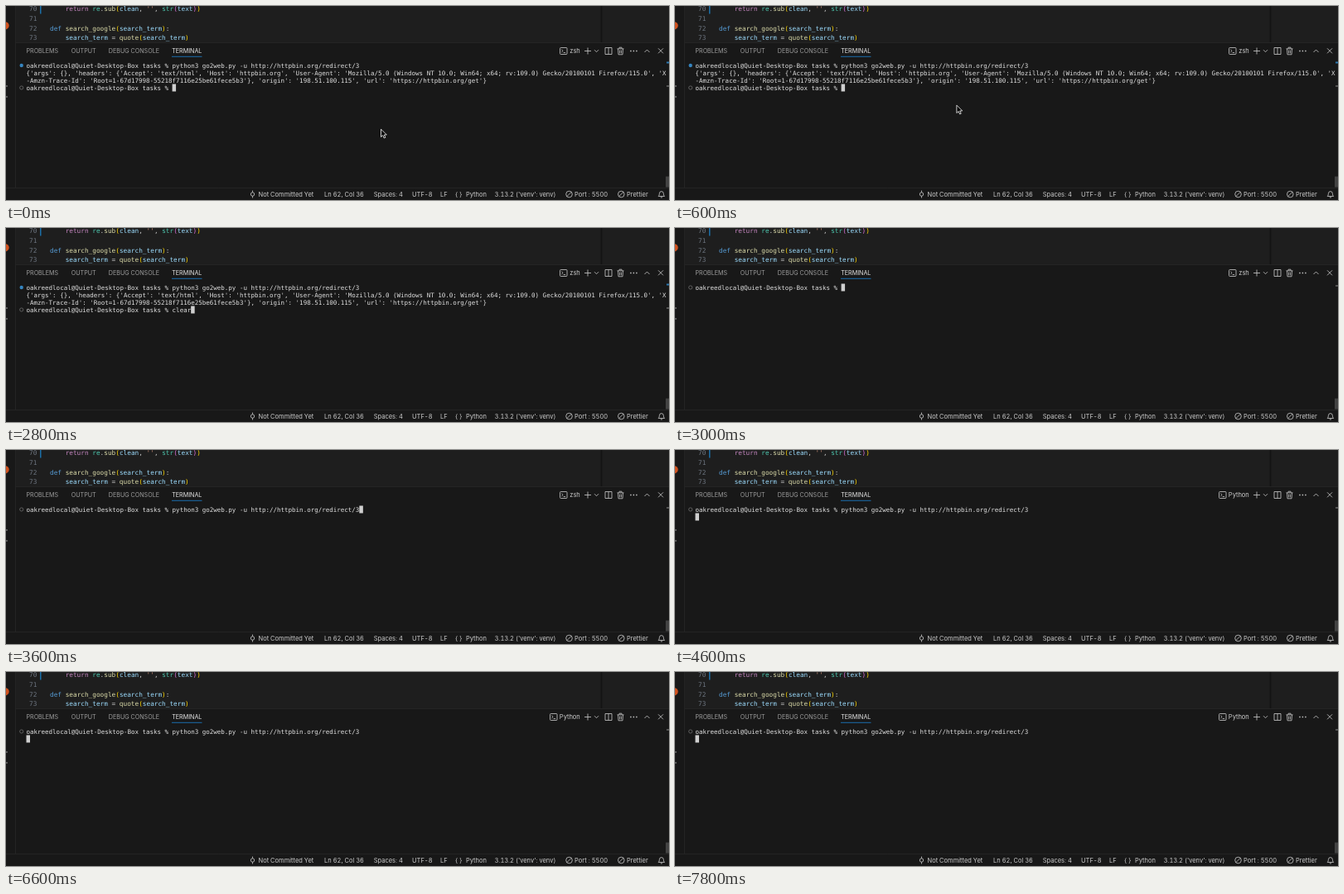
An HTML page for the animation above (8000 ms loop, 800 px wide and 235 px high).

```html
<!DOCTYPE html>
<html lang="en">
<head>
<meta charset="utf-8">
<title>Terminal session</title>
<style>
html, body { margin: 0; width: 100%; height: 100%; overflow: hidden; background: #181818; }
svg { display: block; width: 800px; height: 235px; }
text { white-space: pre; fill: #ccc; }
.mono { font: 7.5px "DejaVu Sans Mono", monospace; fill: #e0e0e0; }
.code { font: 7.74px "DejaVu Sans Mono", monospace; }
.num { fill: #6e7681; }
.tab { font: 7.15px Inter, sans-serif; fill: #9d9d9d; }
.tab.on { fill: #e7e7e7; }
.bar { font: 7.5px Inter, sans-serif; font-variant-numeric: tabular-nums; }
.icon { fill: none; stroke: #ccc; stroke-width: .8; }
.kw { fill: #c586c0; } .def { fill: #569cd6; } .type { fill: #4ec9b0; } .fn { fill: #dcdcaa; }
.var { fill: #9cdcfe; } .str { fill: #ce9178; } .p1 { fill: #ffd700; } .p2 { fill: #da70d6; }
</style>
</head>
<body>
<svg viewBox="0 0 800 235">
  <rect width="800" height="235" fill="#181818"/>
  <rect x="12" width="788" height="44" fill="#1e1e1e"/>
  <path d="M11.5 0V220M12 44.5H800M0 220.5H800" stroke="#242424"/>
  <path d="M718.5 0V44" stroke="#141414" stroke-width="2"/>
  <circle cx="-1" cy="23.8" r="4.7" fill="#d0521f"/>
  <g fill="#aaa"><circle cx="1" cy="97" r=".8"/><circle cx="1" cy="110" r=".8"/></g>
  <rect x="41" width="1.5" height="9.5" fill="#1b6fa8"/>
  <rect x="796" y="206.5" width="4" height="13" fill="#434343"/>

  <g id="editor"></g>
  <g id="labels"></g>
  <path d="M200 61.3h36.5" stroke="#1a75bd" stroke-width=".9"/>

  <g class="icon">
    <path d="M698 54.5h8M702 50.5v8M710 53.2l2.5 2.5 2.5-2.5"/>
    <path d="M723 50.5h8v8h-8zM727 50.5v8"/>
    <path d="M737.5 51.8h8M740 51.5v-1.3h3v1.3M738.5 52l.5 6.8h5l.5-6.8M740.6 53.5v3.8M742.4 53.5v3.8"/>
    <path d="M753.2 54.5h1.4M756.7 54.5h1.4M760.2 54.5h1.4" stroke-width="1.3"/>
    <path d="M770.5 56l3-3 3 3M787 51.3l6 6M793 51.3l-6 6"/>
    <circle cx="297.5" cy="228" r="2.2"/><path d="M297.5 223.5v2.3M297.5 230.2v2.3"/>
    <circle cx="679.5" cy="228" r="3.8"/><path d="M682.2 225.3l-5.4 5.4"/>
    <circle cx="742.3" cy="228" r="3.8"/><path d="M745 225.3l-5.4 5.4"/>
    <path d="M787.2 230.5q1.2-1 1.2-3.2a2.5 2.7 0 0 1 5 0q0 2.2 1.2 3.2zM789.8 231.6q1.1 1 2.2 0"/>
  </g>
  <g id="shell">
    <path class="icon" d="M669.5 50.5h6.5q1 0 1 1v6q0 1-1 1h-6.5q-1 0-1-1v-6q0-1 1-1zM670.3 52.7l1.8 1.7-1.8 1.7M672.6 56.5h2.5"/>
  </g>
  <text id="shellName" class="bar" x="692.8" y="57.2" text-anchor="end"></text>

  <g id="history">
    <circle cx="18.7" cy="72" r="2.2" fill="#3585c0"/>
    <rect x="797" y="67.5" width="3" height="2" fill="#2b78b0"/>
  </g>
  <g id="prompt">
    <circle cx="18.7" cy="72" r="2.1" fill="none" stroke="#777" stroke-width=".7"/>
    <rect x="797" y="69" width="3" height="2" fill="#555"/>
  </g>
  <rect id="caret" width="4.5" height="9" fill="#cfcfcf"/>
  <path id="mouse" d="M0 0v9.4l2.2-2 1.5 3.4 1.6-.7-1.5-3.3h3z" fill="#000" stroke="#fff" stroke-width=".8"/>
</svg>
<script>
const $ = id => document.getElementById(id);
const LEFT = 24.5, CHAR = 7.5 * 0.602, LINE = 9, LOOP = 8000;
const PROMPT = "oakreedlocal@Quiet-Desktop-Box tasks % ";
const COMMAND = "python3 go2web.py -u http://httpbin.org/redirect/3";

function addText(parent, x, y, cls, content = "") {
  const el = document.createElementNS("http://www.w3.org/2000/svg", "text");
  el.setAttribute("x", x);
  el.setAttribute("y", y);
  el.setAttribute("class", cls);
  for (const part of [].concat(content)) {
    const [word, color] = part.split("~");
    const span = document.createElementNS(el.namespaceURI, "tspan");
    span.textContent = word;
    if (color) span.setAttribute("class", color);
    el.append(span);
  }
  $(parent).append(el);
  return el;
}

// Code above the panel; "word~class" colours a word.
const code = [
  ["    ", "return~kw", " ", "re~type", ".", "sub~fn", "(~p1", "clean~var", ", ", "''~str", ", ",
    "str~type", "(~p2", "text~var", ")~p2", ")~p1"],
  [""],
  ["def~def", " ", "search_google~fn", "(~p1", "search_term~var", ")~p1", ":"],
  ["    ", "search_term~var", " = ", "quote~fn", "(~p1", "search_term~var", ")~p1"]
];
code.forEach((parts, i) => {
  const y = 6.3 + i * 11.6;
  addText("editor", 28, y, "code num", String(70 + i));
  addText("editor", 53, y, "code", parts);
});

[[24.5, "PROBLEMS"], [78.8, "OUTPUT"], [123.8, "DEBUG CONSOLE"], [200.2, "TERMINAL"]]
  .forEach(([x, s]) => addText("labels", x, 57, s === "TERMINAL" ? "tab on" : "tab", s));
[[304.5, "Not Committed Yet"], [384, "Ln 62, Col 36"], [443.7, "Spaces: 4"], [490, "UTF-8"],
  [524, "LF"], [542.3, "{ }"], [555, "Python"], [589.5, "3.13.2 ('venv': venv)"],
  [686, "Port : 5500"], [749, "Prettier"]]
  .forEach(([x, s]) => addText("labels", x, 230.8, "bar", s));

[PROMPT + COMMAND,
  "{'args': {}, 'headers': {'Accept': 'text/html', 'Host': 'httpbin.org', 'User-Agent': " +
    "'Mozilla/5.0 (Windows NT 10.0; Win64; x64; rv:109.0) Gecko/20100101 Firefox/115.0', 'X",
  "-Amzn-Trace-Id': 'Root=1-67d17998-55218f7116e25be61fece5b3'}, " +
    "'origin': '198.51.100.115', 'url': 'https://httpbin.org/get'}"]
  .forEach((s, i) => addText("history", LEFT, 74.7 + i * LINE, "mono", s));
const input = addText("prompt", LEFT, 74.7, "mono");

// Each step lists what changes at its time.
const steps = [
  { at: 0, typed: "", row: 3, mouse: [452.5, 149.2], running: false, shell: "zsh" },
  { at: 200, mouse: [420, 141] },
  { at: 400, mouse: [356, 125] },
  { at: 600, mouse: [339.9, 120.2] },
  { at: 1800, typed: "cle", mouse: null },
  { at: 2000, typed: "clear" },
  { at: 3000, typed: "", row: 0 },
  { at: 3200, typed: "clear" },
  { at: 3400, typed: COMMAND },
  { at: 4000, running: true },
  { at: 4400, shell: "Python" }
];

let shown = -1;
function draw(now) {
  const t = now % LOOP;
  const count = steps.filter(s => s.at <= t).length;
  if (count !== shown) {
    shown = count;
    const { typed, row, mouse, running, shell } = Object.assign({}, ...steps.slice(0, count));
    const column = running ? 0 : PROMPT.length + typed.length;
    input.textContent = PROMPT + typed;
    $("history").style.display = row ? "" : "none";
    $("prompt").setAttribute("transform", `translate(0 ${row * LINE})`);
    $("caret").setAttribute("x", LEFT + column * CHAR);
    $("caret").setAttribute("y", 67.5 + (row + running) * LINE);
    $("mouse").style.display = mouse ? "" : "none";
    if (mouse) $("mouse").setAttribute("transform", `translate(${mouse})`);
    $("shellName").textContent = shell;
    $("shell").setAttribute("transform", `translate(${shell === "zsh" ? 0 : -12} 0)`);
  }
  requestAnimationFrame(draw);
}
draw(performance.now());
</script>
</body>
</html>
```
